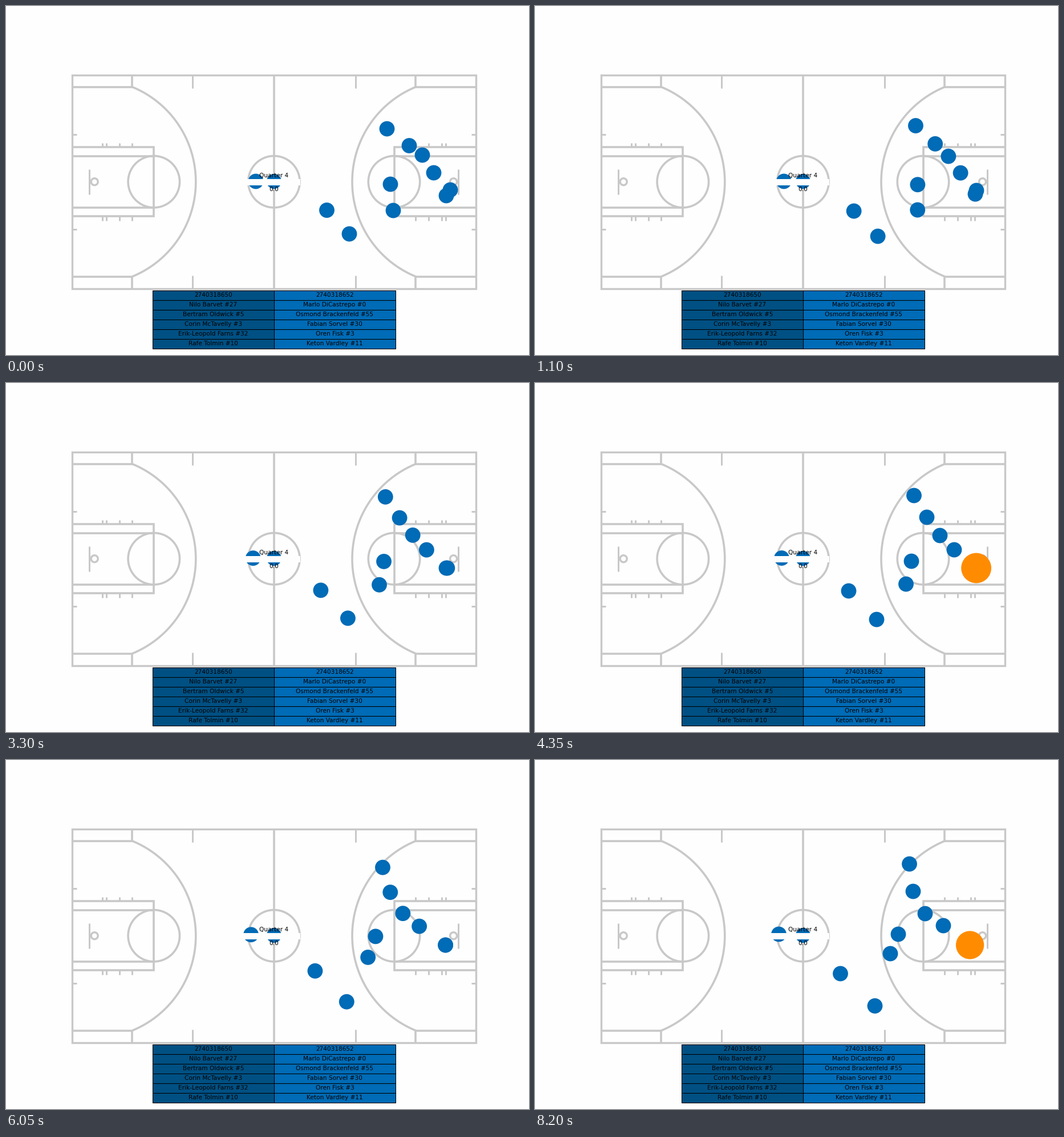
Recreate the animation shown at these times as a matplotlib script. Size 917x611 px, loop 8250 ms.

```python
import numpy as np
import matplotlib.pyplot as plt
from matplotlib.animation import FuncAnimation
from matplotlib.patches import Circle, Rectangle

W, H, DPI = 917, 611, 64
PT = 72 / DPI  # points per pixel
BG, GREY, BLUE, NAVY, ORANGE = "#fefefe", "#c8c8c8", "#006bb6", "#005083", "#ff8c00"
MID_X, MID_Y = 469.9, 307.7
LEFT, TOP, BOTTOM = 116, 121.2, 495
STEPS, HOLD = 15, 11  # court positions, ticks spent on each
DOT = 13.4

fig = plt.figure(figsize=(W / DPI, H / DPI), dpi=DPI, facecolor=BG)
ax = fig.add_axes([0, 0, 1, 1])
ax.set_xlim(0, W)
ax.set_ylim(H, 0)
ax.axis("off")


def line(xs, ys, width=3.6):
    ax.plot(xs, ys, color=GREY, lw=width * PT, solid_capstyle="butt",
            solid_joinstyle="miter", zorder=1)


def ring(x, y, r, width=3.6):
    ax.add_patch(Circle((x, y), r, fill=False, ec=GREY, lw=width * PT, zorder=1))


def label(x, y, text):
    ax.text(x, y, text, ha="center", va="center", color="black",
            family="DejaVu Sans", size=10.55 * PT, zorder=6)


def disc(x=0, y=0, r=DOT, z=2):
    return ax.add_patch(Circle((x, y), r, fc=BLUE, ec="none", zorder=z))


def half_court(side):
    """Draw one half; dx and dy are distances from the court's centre."""
    def path(dx, dy, width=3.6):
        line(MID_X + side * np.asarray(dx), MID_Y + np.asarray(dy), width)

    base, lane, corner, half = MID_X - LEFT, 210.6, 166, (BOTTOM - TOP) / 2

    radius, hoop = 179.3, 316.4
    a = np.arcsin(corner / radius)
    t = np.linspace(-a, a, 90)
    path(hoop - radius * np.cos(t), radius * np.sin(t))

    for up in (-1, 1):
        path([base, 247], [up * corner] * 2)
        path([248.4] * 2, [up * half, up * corner])
        path([base, lane], [up * 45.2] * 2)
        path([143] * 2, [up * half, up * (half - 23)], 3)
        path([base, base - 8], [up * 83] * 2, 3)
        for dx in (248.4, 271, 293.7, 301):
            path([dx] * 2, [up * 60.5, up * 68], 3)

    path([base, lane, lane, base], [-60.5, -60.5, 60.5, 60.5])
    ring(MID_X + side * lane, MID_Y, 45.2)
    path([323.5] * 2, [-22, 22], 3)
    ring(MID_X + side * 314.7, MID_Y, 6, 3.4)


def court():
    ax.add_patch(Rectangle((LEFT, TOP), 2 * (MID_X - LEFT), BOTTOM - TOP,
                           fill=False, ec=GREY, lw=3.4 * PT, zorder=1))
    line([MID_X, MID_X], [TOP, BOTTOM])
    ring(MID_X, MID_Y, 45.2)
    half_court(-1)
    half_court(1)


def roster():
    home = ["2740318650", "Nilo Barvet #27", "Bertram Oldwick #5",
            "Corin McTavelly #3", "Erik-Leopold Farns #32", "Rafe Tolmin #10"]
    away = ["2740318652", "Marlo DiCastrepo #0", "Osmond Brackenfeld #55",
            "Fabian Sorvel #30", "Oren Fisk #3", "Keton Vardley #11"]
    x0, y0, w, h = 257, 498, 213, 16.93
    for col, (names, color) in enumerate(((home, NAVY), (away, BLUE))):
        for row, name in enumerate(names):
            x, y = x0 + col * w, y0 + row * h
            ax.add_patch(Rectangle((x, y), w, h, fc=color, ec="black",
                                   lw=1.05 * PT, zorder=5))
            label(x + w / 2, y + h / 2, name)


def glide(start, mid, end, u):
    """Parabola through three points at u = 0, 0.5 and 1."""
    s, m, e = map(np.array, (start, mid, end))
    return s * (1 - u) * (1 - 2 * u) + 4 * m * u * (1 - u) + e * u * (2 * u - 1)


RUNS = [
    ((668, 215), (664.5, 197), (656.5, 182)),
    ((707, 244.5), (687, 235), (663, 230)),
    ((730, 261), (710, 267), (684, 269)),
    ((750, 292), (735, 292), (716, 290)),
    ((674, 312), (660, 312), (637, 305)),
    ((679, 358), (650.5, 352), (623, 339)),
    ((562.5, 357.5), (550, 364), (535.5, 374)),
    ((602, 399), (599, 414), (596, 430.5)),
    ((438, 307), (432.5, 306.5), (427.5, 305)),
]


def positions(k):
    """Nine runners, then the player who catches the ball."""
    u = k / (STEPS - 1)
    catcher = min(772, hands_x(u)), 324 + max(0, 8 - 1.4 * k)
    return [glide(*run, u) for run in RUNS] + [catcher]


def hands_x(u):
    return 774 - 11.4 * u ** 5


def ball_state(k):
    """The ball drops into the catcher's hands and is then carried."""
    x = hands_x(k / (STEPS - 1)) + max(0, 5 - 2.5 * k)
    y = min(322 + k / 2, 324)
    r = max(40 - 5.5 * k, 27 - 0.012 * k * k)
    return x, y, r


court()
disc(MID_X, 307, 13)
players = [disc() for _ in positions(0)]
ball = disc(z=3)
ax.add_patch(Rectangle((400, 303), 115.5, 11, fc=BG, ec="none", zorder=4))
label(MID_X, 297, "Quarter 4")
label(MID_X, 321.4, "0.0")
roster()


def update(tick):
    step, phase = divmod(tick, HOLD)
    for dot, place in zip(players, positions(step)):
        dot.center = place
    x, y, r = ball_state(step)
    flash = phase == HOLD - 1
    ball.center = x, y
    ball.set_radius(r if flash else DOT)
    ball.set_facecolor(ORANGE if flash else BLUE)
    return [*players, ball]


anim = FuncAnimation(fig, update, frames=STEPS * HOLD, interval=50,
                     repeat=True, repeat_delay=0, blit=False)
plt.show()
```
